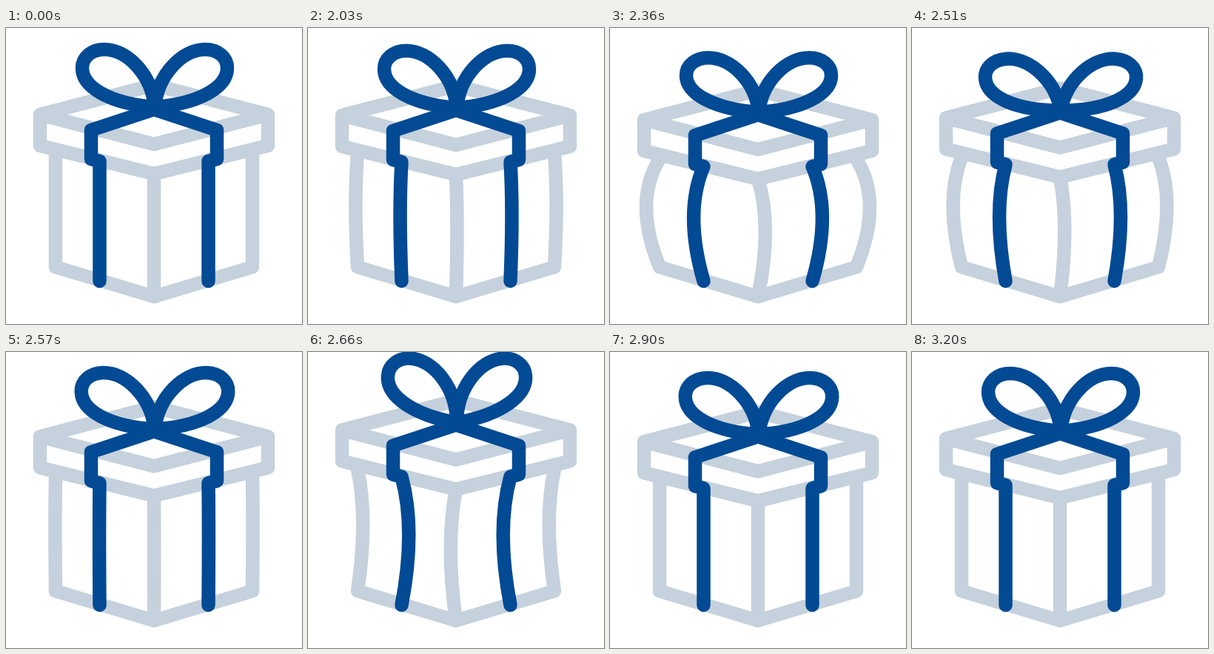
Recreate the animation shown at these times as an HTML page. Size 400x400 px, loop 3230 ms.

```html
<!DOCTYPE html>
<html lang="en">
<head>
<meta charset="utf-8">
<title>Gift box</title>
<style>
html, body { margin: 0; height: 100%; overflow: hidden; background: #fff; }
svg { display: block; width: 100vw; height: 100vh; }
path { fill: none; stroke-width: 18.5; stroke-linecap: round; stroke-linejoin: round; }
.box { stroke: #c5d1dc; }
.ribbon { stroke: #024a94; }
</style>
</head>
<body>
<svg viewBox="0 0 400 400">
  <path class="box" id="body"/>
  <path class="box" id="lid"/>
  <path class="ribbon" id="band"/>
  <path class="ribbon" id="bow"/>
</svg>
<script>
const LOOP = 3230, START = 2030, STEP = 30;

// Half a sine wave from 0 to 1 and back, zero outside its span
function hump(t, start, length) {
  const u = (t - start) / length;
  return u > 0 && u < 1 ? Math.sin(Math.PI * u) : 0;
}

function pose(t) {
  const squash = hump(t, 2000, 650), jump = hump(t, 2520, 320);
  const land = hump(t, 2840, 140), settle = hump(t, 2980, 220);
  const sway = hump(t, 2060, 300) - hump(t, 2360, 300);
  return {
    dy: 7.2 * squash - 11.7 * jump + 4.4 * land - 2 * settle,
    bulge: 1.18 * squash - 0.87 * jump,
    turn: 4.6 * sway + 5 * jump - 1.4 * land
  };
}

// Bends an upright edge sideways by d at its middle
const bend = (x, y0, y1, d) => `Q${x + 2 * d} ${(y0 + y1) / 2 - 15} ${x} ${y1}`;
const edge = (x, y0, y1, d) => `M${x} ${y0}` + bend(x, y0, y1, d);
const set = (id, d) => document.getElementById(id).setAttribute("d", d);

// One loop of the bow, turned about the knot and stretched upwards
function loop(side, { dy, bulge, turn }) {
  const a = turn * Math.PI / 180, c = Math.cos(a), s = Math.sin(a);
  const tall = 1 - 0.045 * bulge;
  const p = (x, y) => `${201 + side * (x * c - y * s)} ${108 + dy + (y * c + x * s) * tall} `;
  return "M" + p(0, -1) + "C" + p(-4, -46) + p(-38, -79) + p(-68, -79)
    + "C" + p(-86, -79) + p(-98, -68) + p(-98, -54)
    + "C" + p(-98, -28) + p(-61, -6) + p(0, -1);
}

function band(side, { dy, bulge }) {
  const x = v => 200 + side * v;
  return `M200 ${110 + dy}L${x(85)} ${138 + dy}V${177 + dy}L${x(73.5)} ${180 + dy}`
    + bend(x(73.5), 180 + dy, 342, side * 11.5 * bulge);
}

function draw(t) {
  const now = pose(t), { dy, bulge } = now;
  const side = bulge * (bulge > 0 ? 15.5 : 8.5);
  set("body", edge(67, 170 + dy, 323, -side) + "L200 363L333 323"
    + edge(333, 170 + dy, 323, side) + edge(200, 197 + dy, 363, 8.5 * bulge));
  set("lid", `M46 ${117 + dy}L200 ${77 + dy}L354 ${117 + dy}L200 ${157 + dy}Z`
    + `V${159 + dy}L200 ${197 + dy}L354 ${159 + dy}V${117 + dy}`);
  set("band", band(-1, now) + band(1, now));
  set("bow", loop(-1, now) + loop(1, now));
}

const t0 = performance.now();
function tick() {
  const t = (performance.now() - t0) % LOOP;
  draw(t < START ? 0 : START + Math.floor((t - START) / STEP) * STEP);
  requestAnimationFrame(tick);
}
tick();
</script>
</body>
</html>
```
